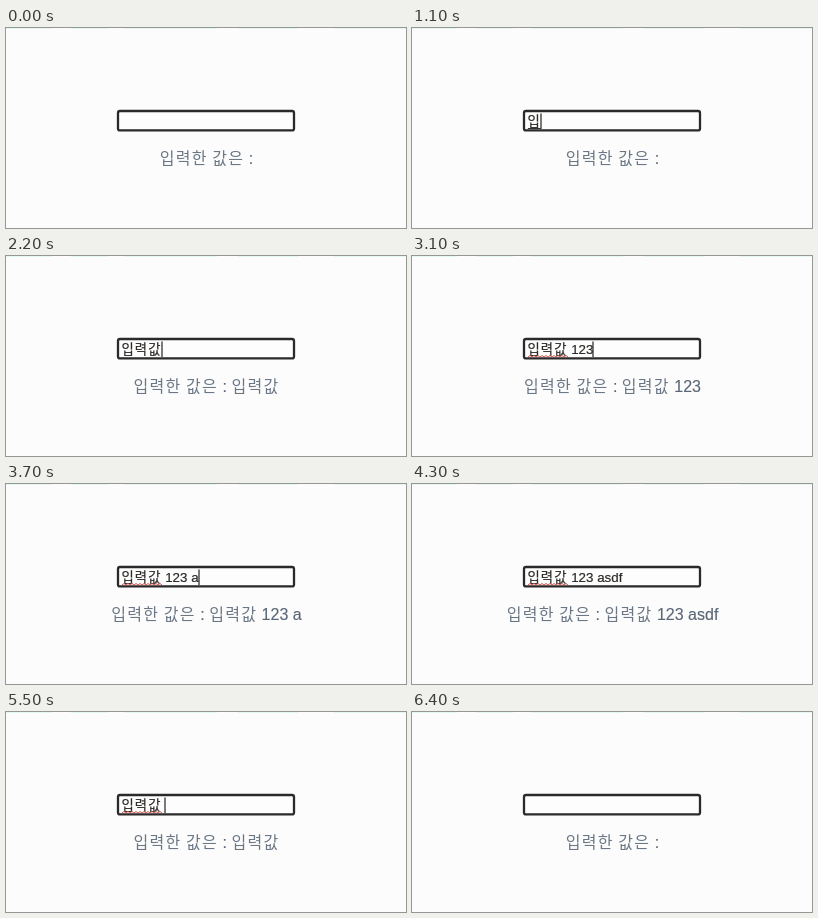
An HTML page for the animation above (6800 ms loop, 400 px wide and 200 px high).

```html
<!DOCTYPE html>
<html lang="ko">
<head>
<meta charset="utf-8">
<style>
html, body { margin: 0; height: 100%; overflow: hidden; background: #fcfcfc; }
svg { display: block; }
text { font-family: "Liberation Sans", "Noto Sans CJK KR", sans-serif; white-space: pre; }
tspan { letter-spacing: .08em; }
#field { font-size: 13.333px; fill: #2c2926; stroke: #2c2926; stroke-width: .2; }
#label { font-size: 16px; fill: #596675; stroke: #596675; stroke-width: .15; text-anchor: middle; }
#label tspan { fill: #6b7785; stroke: none; }
</style>
</head>
<body>
<svg width="400" height="200" viewBox="0 0 400 200">
  <path d="M0 .5H45M65 .5H101M119 .5H211M232 .5H292M328 .5H400" stroke="#e2f8f1"/>
  <rect x="112" y="83" width="176" height="19.4" rx="2" fill="#fdfdfd" stroke="#2a2a2a" stroke-width="2.3"/>
  <text id="field" x="115.5" y="98"></text>
  <path id="wave" fill="none" stroke="#d8564c"/>
  <path id="under" stroke="#333"/>
  <path id="caret" stroke="#222" stroke-width="1.2"/>
  <text id="label" x="200.5" y="135.8"></text>
</svg>
<script>
const LOOP = 6800, LEFT = 115.5;
const [field, wave, under, caret, label] =
  ['field', 'wave', 'under', 'caret', 'label'].map(id => document.getElementById(id));

// time, typed text, flags: c = caret, i = last syllable still composing, w = spelling mark
const steps = [
  [0, '', ''], [300, '', 'c'], [700, '', ''],
  [1000, '이', 'ci'], [1100, '입', 'ci'],
  [1400, '입ㄹ', 'ci'], [1500, '입려', 'ci'], [1600, '입력', 'ci'],
  [1900, '입력가', 'ci'], [2000, '입력값', 'ci'], [2200, '입력값', 'c'],
  [2600, '입력값 ', 'c'], [2700, '입력값 ', 'cw'],
  [2900, '입력값 1', 'cw'], [3000, '입력값 12', 'cw'], [3100, '입력값 123', 'cw'],
  [3500, '입력값 123 ', 'cw'], [3700, '입력값 123 a', 'cw'],
  [3800, '입력값 123 asd', 'cw'], [4000, '입력값 123 asdf', 'cw'], [4200, '입력값 123 asdf', 'w'],
  [4600, '입력값 123 asdf', 'cw'], [4700, '입력값 123 asd', 'cw'], [4900, '입력값 123 as', 'cw'],
  [5000, '입력값 123 a', 'cw'], [5100, '입력값 123 ', 'cw'],
  [5400, '입력값 12', 'cw'], [5500, '입력값 ', 'cw'], [5600, '입력', 'c'],
  [5700, '', 'c'], [6400, '', '']
];

let zigzag = 'M116 101';
for (let x = 118, up = true; x <= 156; x += 2, up = !up) zigzag += `L${x} ${up ? 99.5 : 101}`;
wave.setAttribute('d', zigzag);

const setText = (el, s) => {
  el.innerHTML = s.replace(/[ㄱ-ㅎ가-힣]+/g, '<tspan>$&</tspan>');
};
const show = (el, on) => el.setAttribute('visibility', on ? 'visible' : 'hidden');

let current;
function draw(now) {
  const t = now % LOOP;
  const step = steps.findLast(s => s[0] <= t);
  if (step !== current) {
    current = step;
    const [, text, flags] = step;
    const composing = flags.includes('i');
    setText(field, text);
    setText(label, ('입력한 값은 : ' + (composing ? text.slice(0, -1) : text)).trim());
    const end = LEFT + (text ? field.getComputedTextLength() : 0);
    caret.setAttribute('d', `M${Math.round(end)} 85.5V101`);
    under.setAttribute('d', `M${end - 13} 100.5H${end}`);
    show(caret, flags.includes('c'));
    show(under, composing);
    show(wave, flags.includes('w'));
  }
  requestAnimationFrame(() => draw(performance.now()));
}
draw(0);
</script>
</body>
</html>
```
